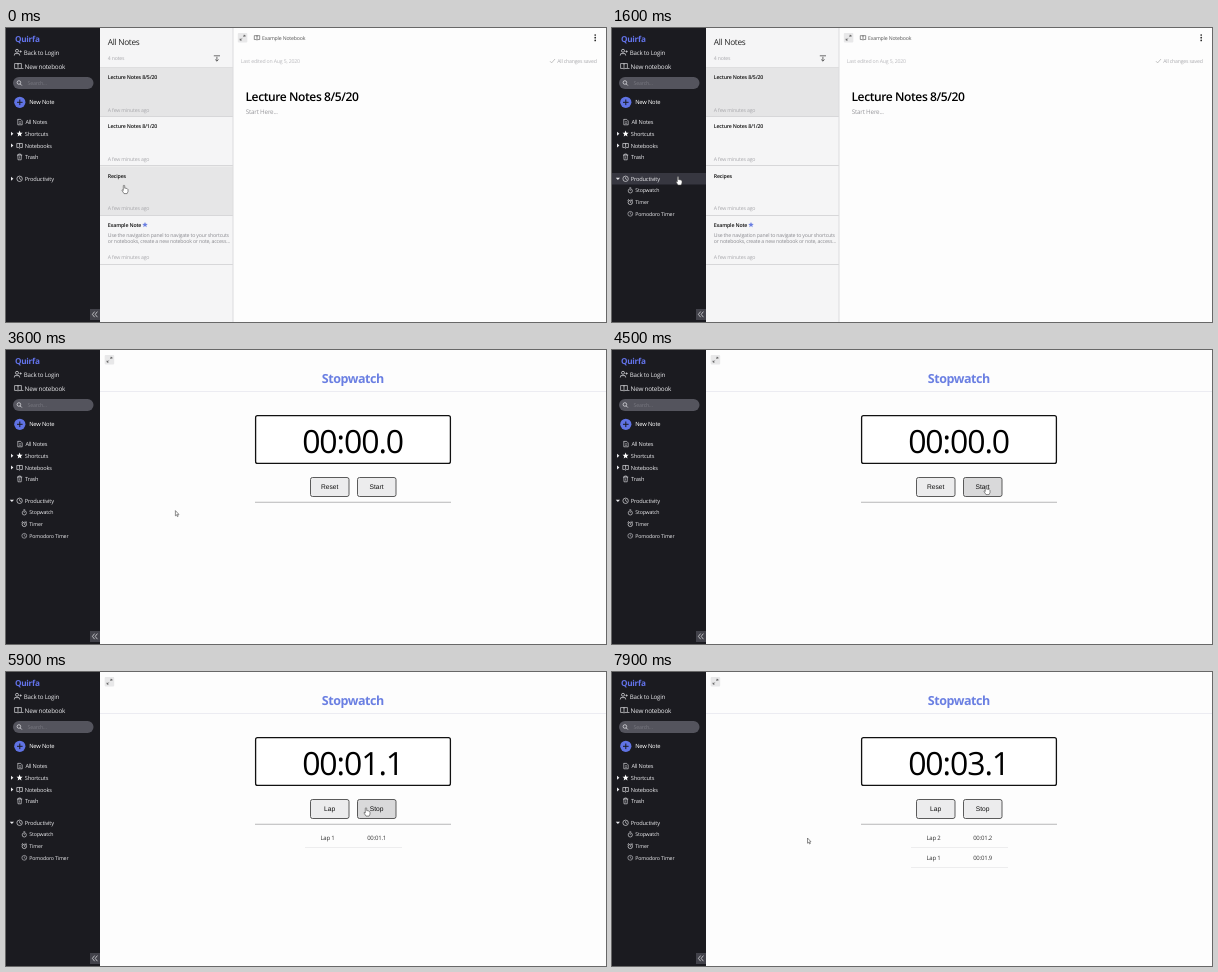
An HTML page with a canvas that plays this animation: 600x294 px, repeating every 8 s.

```html
<!DOCTYPE html>
<html lang="en">
<head>
<meta charset="utf-8">
<title>Notes and stopwatch</title>
<style>
html, body { margin: 0; width: 100%; height: 100%; overflow: hidden; background: #fdfdfd; }
canvas { display: block; width: 600px; height: 294px; }
</style>
</head>
<body>
<canvas id="stage"></canvas>
<script>
const W = 600, H = 294, LOOP = 8000, STEP = 100;
const canvas = document.getElementById('stage');
const dpr = window.devicePixelRatio || 1;
canvas.width = W * dpr;
canvas.height = H * dpr;
const ctx = canvas.getContext('2d');

const SANS = '"Open Sans", "Noto Sans", sans-serif';
const UI = '"Liberation Sans", Arial, sans-serif';
const INK = '#111', MUTED = '#a9a9ad', DARK = '#1b1b20', LIGHT = '#e9e9ec', BLUE = '#6a7fe2';

const OPEN_MENU = 900, SHOW_WATCH = 2500, START = 4800, LAP = 6700;

// Pointer tip: time, x, y
const PATH = [
  [0, 118, 157], [300, 85, 186], [600, 66, 148.5],
  [1600, 66, 148.5], [2300, 60, 160],
  [3100, 60, 160], [3500, 140, 166], [4000, 287, 139], [4400, 374, 136],
  [5600, 374, 136], [5900, 360, 135.5], [6400, 322.5, 137],
  [7400, 322.5, 137], [7900, 195.5, 166], [8000, 195.5, 166]
];

const clamp = v => Math.max(0, Math.min(1, v));

function pointerAt(t) {
  let i = 1;
  while (i < PATH.length - 1 && t > PATH[i][0]) i++;
  const [t0, x0, y0] = PATH[i - 1], [t1, x1, y1] = PATH[i];
  const k = clamp((t - t0) / (t1 - t0));
  return { x: x0 + (x1 - x0) * k, y: y0 + (y1 - y0) * k };
}

function inside(p, x, y, w, h) {
  return p.x >= x && p.x < x + w && p.y >= y && p.y < y + h;
}

function rect(x, y, w, h, fill) {
  ctx.fillStyle = fill;
  ctx.fillRect(x, y, w, h);
}

function box(x, y, w, h, r, fill, stroke, lw = 1) {
  ctx.beginPath();
  ctx.roundRect(x, y, w, h, r);
  if (fill) { ctx.fillStyle = fill; ctx.fill(); }
  if (stroke) { ctx.strokeStyle = stroke; ctx.lineWidth = lw; ctx.stroke(); }
}

function circle(x, y, r, fill, stroke, lw = 0.7) {
  ctx.beginPath();
  ctx.arc(x, y, r, 0, Math.PI * 2);
  if (fill) { ctx.fillStyle = fill; ctx.fill(); }
  if (stroke) { ctx.strokeStyle = stroke; ctx.lineWidth = lw; ctx.stroke(); }
}

function trace(pts) {
  ctx.beginPath();
  for (let i = 0; i < pts.length; i += 2) ctx.lineTo(pts[i], pts[i + 1]);
}

function line(color, lw, ...pts) {
  trace(pts);
  ctx.strokeStyle = color;
  ctx.lineWidth = lw;
  ctx.stroke();
}

function poly(color, ...pts) {
  trace(pts);
  ctx.fillStyle = color;
  ctx.fill();
}

// y is the middle of the capitals
function text(str, x, y, size, color, weight = 400, align = 'left', font = SANS) {
  ctx.font = `${weight} ${size}px ${font}`;
  ctx.letterSpacing = font === SANS ? `${-0.034 * size}px` : '0px';
  ctx.textRendering = 'geometricPrecision';
  ctx.textAlign = align;
  ctx.fillStyle = color;
  ctx.fillText(str, x, y + size * 0.36);
}

function star(x, y, r, color) {
  const pts = [];
  for (let i = 0; i < 10; i++) {
    const a = -Math.PI / 2 + i * Math.PI / 5, d = i % 2 ? r * 0.45 : r;
    pts.push(x + d * Math.cos(a), y + d * Math.sin(a));
  }
  poly(color, ...pts);
}

function book(x, y, w, color) {
  const h = w * 0.36, m = w / 2;
  line(color, 0.65, x, y - h + 1, x, y - h, x - m, y - h, x - m, y + h, x - 0.8, y + h,
    x, y + h + 0.7, x + 0.8, y + h, x + m, y + h, x + m, y - h, x, y - h, x, y + h);
}

function clock(x, y, r, color) {
  circle(x, y, r, null, color, 0.65);
  line(color, 0.6, x, y - r * 0.6, x, y, x + r * 0.5, y + r * 0.3);
}

function expandButton(x, y) {
  box(x, y, 9.5, 9.5, 1, '#e8e8e9');
  const cx = x + 4.75, cy = y + 4.75;
  for (const s of [-1, 1]) {
    line('#444', 0.6, cx + s * 0.7, cy - s * 0.7, cx + s * 2.3, cy - s * 2.3);
    line('#444', 0.7, cx + s * 0.9, cy - s * 2.4, cx + s * 2.4, cy - s * 2.4, cx + s * 2.4, cy - s * 0.9);
  }
}

function caret(y, open) {
  if (open) poly(LIGHT, 3.8, y - 1, 8, y - 1, 5.9, y + 1.3);
  else poly(LIGHT, 5, y - 2, 7.4, y, 5, y + 2);
}

function sidebar(t, p) {
  rect(0, 0, 94, H, DARK);
  text('Quirfa', 9, 11, 8.2, '#6373ea', 700);

  circle(11, 22.8, 1.5, null, LIGHT);
  line(LIGHT, 0.7, 8.3, 27.5, 8.8, 25.6, 13.1, 25.6, 13.7, 27.5);
  line(LIGHT, 0.6, 13.4, 23.5, 15.8, 23.5);
  line(LIGHT, 0.6, 14.6, 22.3, 14.6, 24.7);
  text('Back to Login', 17.7, 24.6, 6.15, LIGHT);
  book(12, 38, 6.8, LIGHT);
  line(LIGHT, 0.6, 15.5, 40.5, 17.5, 40.5);
  text('New notebook', 18.6, 38.3, 6.35, LIGHT);

  box(7, 49, 80.5, 12, 6, '#54545d');
  circle(12.9, 54.5, 1.8, null, LIGHT);
  line(LIGHT, 0.8, 14.2, 55.9, 15.8, 57.5);
  text('Search...', 21.5, 55, 5.3, '#77777f');

  circle(13.8, 74.3, 5.6, '#6073e4');
  line(DARK, 1, 11, 74.3, 16.6, 74.3);
  line(DARK, 1, 13.8, 71.5, 13.8, 77.1);
  text('New Note', 23.2, 74.2, 5.8, '#fff', 500);

  line(LIGHT, 0.6, 11.8, 91.4, 14.7, 91.4, 16.2, 92.9, 16.2, 96.8, 11.8, 96.8, 11.8, 91.1);
  line(LIGHT, 0.5, 13, 93.8, 15, 93.8);
  line(LIGHT, 0.5, 13, 95.3, 15, 95.3);
  text('All Notes', 19.5, 94.3, 5.65, LIGHT);
  caret(105.8);
  star(13.6, 105.8, 3.2, '#fff');
  text('Shortcuts', 18.8, 106, 5.65, LIGHT);
  caret(117.6);
  book(13.6, 117.5, 5.6, LIGHT);
  text('Notebooks', 18.8, 117.8, 5.65, LIGHT);
  line(LIGHT, 0.7, 11, 127, 16.2, 127);
  line(LIGHT, 0.6, 12.6, 126.8, 12.6, 126, 14.6, 126, 14.6, 126.8);
  line(LIGHT, 0.6, 11.8, 127, 12, 131.8, 15.2, 131.8, 15.4, 127);
  line(LIGHT, 0.5, 13.6, 128.3, 13.6, 130.6);
  text('Trash', 19, 129.3, 5.65, LIGHT);

  const hover = '#373740';
  if (inside(p, 0, 145, 94, 11)) rect(0, 145, 94, 11.5, hover);
  else if (t > OPEN_MENU && inside(p, 0, 156, 94, 12)) rect(0, 156.5, 94, 11.5, hover);
  caret(150.8, t >= OPEN_MENU);
  clock(13.6, 150.8, 2.7, LIGHT);
  text('Productivity', 18.8, 151, 5.7, LIGHT);

  const open = clamp((t - OPEN_MENU + STEP) / 300);
  if (open > 0) {
    ctx.save();
    ctx.beginPath();
    ctx.rect(0, 156, 94, 36 * open);
    ctx.clip();
    circle(18.3, 162.9, 2.1, null, LIGHT, 0.6);
    line(LIGHT, 0.6, 17.4, 159.8, 19.2, 159.8);
    line(LIGHT, 0.5, 18.3, 161.7, 18.3, 163);
    text('Stopwatch', 23.3, 162.6, 5.25, LIGHT);
    clock(18.3, 174.4, 2.2, LIGHT);
    line(LIGHT, 0.7, 15.6, 172.5, 17, 171.4);
    line(LIGHT, 0.7, 19.6, 171.4, 21, 172.5);
    text('Timer', 23.3, 174.3, 5.25, LIGHT);
    clock(18.3, 185.8, 2.4, '#bcbcc2');
    text('Pomodoro Timer', 23.3, 186, 5.25, LIGHT);
    ctx.restore();
  }

  rect(84, 281, 10, 11, '#42424a');
  for (const x of [88.6, 91.4]) line('#d8d8dc', 0.8, x, 283.6, x - 2.2, 286.4, x, 289.2);
}

function notes(t) {
  rect(94, 0, 133, H, '#f5f5f6');
  text('All Notes', 101.8, 14, 8.25, '#222');
  text('4 notes', 101.8, 30.3, 5.15, MUTED);
  line('#333', 0.7, 207.8, 27.8, 214, 27.8);
  line('#333', 0.7, 210.9, 28.8, 210.9, 33);
  line('#333', 0.7, 209.2, 31.5, 210.9, 33.2, 212.6, 31.5);

  const top = i => 40 + i * 49.2;
  rect(94, top(0), 133, 49, '#e5e5e6');
  ctx.globalAlpha = 1 - clamp((t - 700) / 300);
  rect(94, top(2), 133, 49, '#e6e6e7');
  ctx.globalAlpha = 1;
  ['Lecture Notes 8/5/20', 'Lecture Notes 8/1/20', 'Recipes', 'Example Note'].forEach((name, i) => {
    text(name, 101.8, top(i) + 9.3, 5.28, INK, 600);
    text('A few minutes ago', 101.8, top(i) + 42, 5.2, MUTED);
  });
  for (let i = 0; i < 5; i++) rect(94, Math.round(top(i)) - 1, 133, 1, i ? '#d7d7d9' : '#dededf');
  star(139, 196.8, 2.9, BLUE);
  text('Use the navigation panel to navigate to your shortcuts', 101.8, 206.7, 5.2, '#8b8b90');
  text('or notebooks, create a new notebook or note, access...', 101.8, 213.4, 5.2, '#8b8b90');
  rect(226.5, 0, 1, H, '#dcdcde');

  expandButton(231.8, 5);
  book(251, 9.6, 5.4, '#555');
  text('Example Notebook', 256, 10, 5.2, '#555');
  for (const y of [7, 9.7, 12.4]) circle(589.2, y, 0.85, '#222');
  text('Last edited on Aug 5, 2020', 234.8, 33, 5.2, '#b9b9bd');
  line('#aaa', 0.7, 544, 33.2, 545.6, 34.9, 549, 31);
  text('All changes saved', 551.2, 33, 5.18, MUTED);
  text('Lecture Notes 8/5/20', 239.5, 68.4, 12.05, '#000', 600);
  text('Start Here...', 239.8, 84, 6.3, '#98989c');
}

function format(tenths) {
  const pad = n => String(n).padStart(2, '0');
  const s = Math.floor(tenths / 10);
  return `${pad(Math.floor(s / 60))}:${pad(s % 60)}.${tenths % 10}`;
}

function button(label, x, p) {
  const over = inside(p, x, 127, 39, 20);
  box(x + 0.5, 127.5, 38.5, 19, 2, over ? '#d9d9da' : '#ececed', '#4a4a4a', 0.9);
  text(label, x + 19.6, 137, 6.67, INK, 400, 'center', UI);
}

function stopwatch(t, p) {
  const running = t >= START;
  const total = running ? Math.floor((t - START) / 100) : 0;
  expandButton(98.7, 5);
  text('Stopwatch', 346.8, 28.8, 12.5, BLUE, 700, 'center');
  rect(94, 41, 506, 1, '#ececf2');
  box(249.6, 65.6, 194.8, 47.8, 2, '#fff', '#111', 1.3);
  text(format(total), 346.6, 91.6, 32, '#000', 400, 'center');
  button(running ? 'Lap' : 'Reset', 304, p);
  button(running ? 'Stop' : 'Start', 351, p);
  rect(249, 151.7, 196, 1.2, '#c2c2c4');
  if (!running) return;

  const split = (LAP - START) / 100;
  const laps = t < LAP ? [total] : [total - split, split];
  laps.forEach((v, i) => {
    const y = 166.3 + i * 19.5;
    text(`Lap ${laps.length - i}`, 321.5, y, 6, '#333', 400, 'center');
    text(format(v), 370.6, y, 6, '#333', 400, 'center');
    rect(299, Math.round(y + 9), 97, 1, '#ededee');
  });
}

function pointer(p, hand) {
  ctx.save();
  ctx.translate(p.x, p.y);
  ctx.lineJoin = 'round';
  const pts = hand
    ? [-0.7, 0.6, 0, 0, 0.7, 0.6, 0.7, 3.2, 2, 3.2, 3.4, 3.8, 4, 4.5, 4, 6.6, 3.1, 8.6,
       0, 8.6, -1.9, 5.6, -1.7, 4.8, -0.7, 5.4]
    : [0, 0, 0, 5.2, 1.2, 4.2, 2, 6, 2.8, 5.6, 2, 3.9, 3.5, 3.8];
  trace(pts);
  ctx.closePath();
  ctx.fillStyle = '#fff';
  ctx.fill();
  ctx.strokeStyle = '#444';
  ctx.lineWidth = 0.6;
  ctx.stroke();
  ctx.restore();
}

function draw(t) {
  ctx.setTransform(dpr, 0, 0, dpr, 0, 0);
  rect(0, 0, W, H, '#fdfdfd');
  const p = pointerAt(t);
  if (t < SHOW_WATCH) notes(t);
  else stopwatch(t, p);
  sidebar(t, p);
  const hand = t < SHOW_WATCH || p.x < 94 || inside(p, 304, 127, 39, 20) || inside(p, 351, 127, 39, 20);
  pointer(p, hand);
}

const begin = performance.now();
function tick() {
  const t = (performance.now() - begin) % LOOP;
  draw(Math.floor(t / STEP) * STEP);
  requestAnimationFrame(tick);
}
tick();
</script>
</body>
</html>
```
